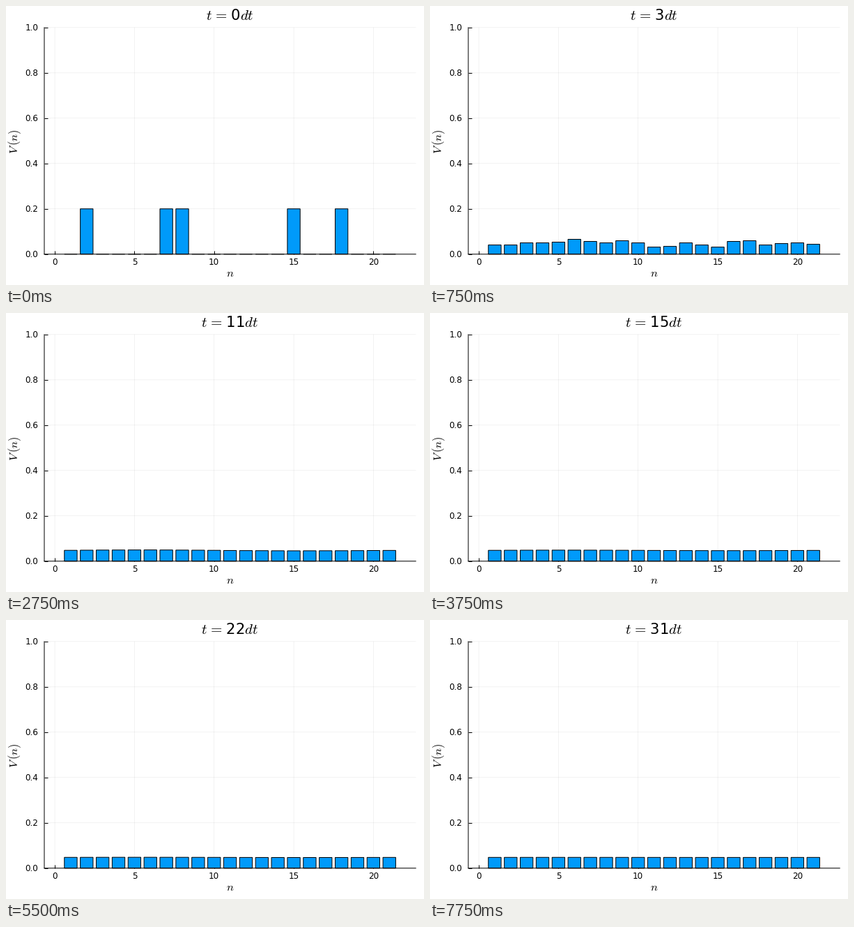
Animation of 600x400 px, one loop 8000 ms. Source, as a matplotlib script:

```python
import matplotlib.pyplot as plt
import numpy as np
from matplotlib.animation import FuncAnimation

W, H, DPI = 600, 400, 100
PX = 72 / DPI  # points per pixel
STEPS, INTERVAL = 32, 250
SITES = 21
START = (2, 7, 8, 15, 18)
HOPS = (-2, -1, 1, 2)
LEFT, RIGHT, TOP, BOTTOM = 54.97, 588.19, 30.87, 355.8
X_MIN, X_MAX = -0.66, 22.66

plt.rcParams.update({"font.family": "DejaVu Sans", "mathtext.fontset": "cm",
                     "path.snap": False})


def walk():
    """Distribution of a random walk on a ring, one row per time step."""
    p = np.zeros(SITES)
    p[np.array(START) - 1] = 1 / len(START)
    rows = [p]
    for _ in range(STEPS - 1):
        p = sum(np.roll(p, hop) for hop in HOPS) / len(HOPS)
        rows.append(p)
    return rows


def title_at(step):
    return rf"$t\hspace{{0.12}}=\hspace{{0.12}}${step}$dt$"


def label(x, y, text, size, ha="center", **kw):
    """Text whose baseline passes through pixel (x, y)."""
    return fig.text(x / W, 1 - y / H, text, size=size * PX,
                    ha=ha, va="baseline", **kw)


fig = plt.figure(figsize=(W / DPI, H / DPI), dpi=DPI, facecolor="white")
ax = fig.add_axes([LEFT / W, 1 - BOTTOM / H, (RIGHT - LEFT) / W, (BOTTOM - TOP) / H])
x_ticks = range(0, 21, 5)
y_ticks = np.linspace(0, 1, 6)
ax.set(xlim=(X_MIN, X_MAX), ylim=(0, 1), xticks=x_ticks, yticks=y_ticks)
ax.set_axisbelow(True)
ax.grid(color="black", alpha=0.1, lw=0.5 * PX, clip_on=False)
ax.spines[["top", "right"]].set_visible(False)
ax.spines[["left", "bottom"]].set_linewidth(PX)
ax.tick_params(direction="in", length=4.7 * PX, width=PX,
               labelleft=False, labelbottom=False)

unit = (RIGHT - LEFT) / (X_MAX - X_MIN)
for x in x_ticks:
    label(LEFT + (x - X_MIN) * unit, 371.4, str(x), 12)
for y in y_ticks:
    label(46.5, BOTTOM - y * (BOTTOM - TOP) + 4.3, f"{y:.1f}", 12, ha="right")

history = walk()
bars = ax.bar(range(1, SITES + 1), history[0], width=0.8, color="#009AFA",
              edgecolor="black", lw=PX, clip_on=False)

title = label(321, 20.5, title_at(0), 21)
label(321.5, 388.5, "$n$", 16.5)
label(17, 194, r"$V\hspace{0.2}(n)$", 16.5, rotation=90, rotation_mode="anchor")


def draw(step):
    for bar, height in zip(bars, history[step]):
        bar.set_height(height)
    title.set_text(title_at(step))
    return [*bars, title]


anim = FuncAnimation(fig, draw, frames=STEPS, interval=INTERVAL,
                     repeat=True, repeat_delay=0)
plt.show()
```
